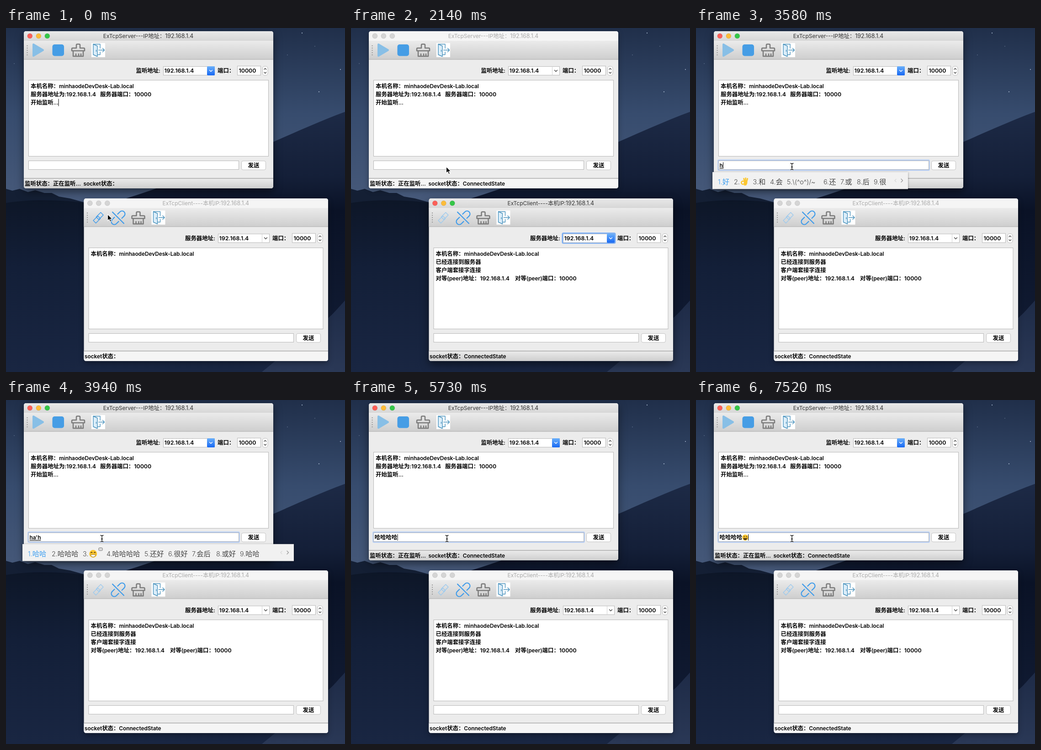
An HTML page that plays this animation: 742x755 px, repeating every 8 s.

```html
<!DOCTYPE html>
<html lang="zh-CN">
<head>
<meta charset="utf-8">
<title>TCP server and client</title>
<style>
html, body { margin: 0; width: 100%; height: 100%; overflow: hidden; background: #101b31; }
svg { display: block; width: 100vw; height: 100vh; }
text { font: 600 11.8px Inter, "Noto Sans CJK SC", "Noto Sans CJK", sans-serif; white-space: pre; }
.c { font-size: 12.4px; font-weight: 700; }
.n { font-size: 12.4px; }
.title { font-weight: 400; font-size: 12px; text-anchor: middle; }
.title .c { font-weight: 400; }
.mid { text-anchor: middle; }
.pre { text-decoration: underline; }
.cand { font-size: 14.3px; font-weight: 300; fill: #444; }
.cand .c { font-size: 15.27px; font-weight: 400; }
.first { fill: #3a9df0; }
.line { fill: none; stroke-linecap: round; stroke-linejoin: round; }
.active { filter: drop-shadow(0 7px 9px rgba(0,0,0,.5)); }
.idle { filter: drop-shadow(0 4px 6px rgba(0,0,0,.35)); }
.pop { filter: drop-shadow(0 1px 2px rgba(0,0,0,.4)); }
</style>
</head>
<body>
<svg viewBox="0 0 742 755" preserveAspectRatio="none">
  <defs>
    <linearGradient id="sky" x2="0" y2="1"><stop stop-color="#202f4a"/><stop offset=".45" stop-color="#374c6e"/><stop offset="1" stop-color="#4a5c7c"/></linearGradient>
    <linearGradient id="dune" x2="0" y2="1"><stop stop-color="#1d2a46"/><stop offset=".25" stop-color="#141f38"/><stop offset=".38" stop-color="#0a1226"/><stop offset="1" stop-color="#131e37"/></linearGradient>
    <linearGradient id="sand" x2="0" y2="1"><stop stop-color="#0d1627"/><stop offset=".4" stop-color="#131f38"/><stop offset="1" stop-color="#192642"/></linearGradient>
    <linearGradient id="near" x2="0" y2="1"><stop stop-color="#1e2b47"/><stop offset="1" stop-color="#2a3856"/></linearGradient>
    <linearGradient id="title" x2="0" y2="1"><stop stop-color="#e9e9e9"/><stop offset="1" stop-color="#d6d6d6"/></linearGradient>
    <linearGradient id="bar" x2="0" y2="1"><stop stop-color="#ebebeb"/><stop offset="1" stop-color="#cecece"/></linearGradient>
    <linearGradient id="blue" x2="0" y2="1"><stop stop-color="#6bb0fa"/><stop offset="1" stop-color="#1768f3"/></linearGradient>
    <g id="broom" class="line" stroke="#7c7c7c" stroke-width="2.5">
      <path d="M-4-5V-11.5q0-2 2-2H2q2 0 2 2V-5H12q2 0 2 2V1H-14V-3q0-2 2-2ZM-11 1V13H11V1M-5 13V8M1 13V8M6 13V8"/>
    </g>
    <g id="exit">
      <rect x="-15" y="-15.5" width="30" height="31" fill="#fff"/>
      <g class="line" stroke="#4b93bd" stroke-width="1.4">
        <path d="M-11-13H4V-4M4 4V10H-2"/><path d="M-11-13L-2-9V14L-11 10Z" fill="#dceefa"/><path d="M-4.5 0V3M1 0H13M9.5-4L13.5 0L9.5 4"/>
      </g>
    </g>
    <path id="grip" fill="#969696" d="M-1-10h2v2h-2zM-1-5h2v2h-2zM-1 0h2v2h-2zM-1 5h2v2h-2zM-1 10h2v2h-2z"/>
  </defs>
  <g id="wallpaper">
    <rect width="742" height="420" fill="url(#sky)"/>
    <g fill="#b9c8df"><circle cx="648" cy="11" r="1"/><circle cx="732" cy="91" r=".9"/><circle cx="685" cy="140" r="1"/><circle cx="616" cy="59" r=".6"/><circle cx="18" cy="78" r=".6"/><circle cx="676" cy="40" r=".6"/></g>
    <path d="M0 353L14 357L30 353L48 360L64 356L84 362L100 362L116 370L140 374L176 384V420H0Z" fill="#141f34"/>
    <path d="M742 184C690 203 640 226 585 250C450 305 360 345 250 378V755H742Z" fill="url(#dune)"/>
    <path d="M0 384C60 374 130 378 185 385L260 374C400 440 480 610 742 720V755H0Z" fill="url(#sand)"/>
    <path d="M742 598C725 616 714 632 690 648L560 755H742Z" fill="url(#near)"/>
  </g>
  <g id="scene"></g>
</svg>
<script>
const LOOP = 8000;
const HOST = '本机名称：minhaodeDevDesk-Lab.local';
const IP = '192.168.1.4';

const rect = (x, y, w, h, fill, more = '') =>
  `<rect x="${x}" y="${y}" width="${w}" height="${h}" fill="${fill}" ${more}/>`;
const path = (d, color, width, more = '') =>
  `<path class="line" d="${d}" stroke="${color}" stroke-width="${width}" ${more}/>`;
const at = (x, y, body) => `<g transform="translate(${x} ${y})">${body}</g>`;
const use = (id, x, y) => `<use href="#${id}" x="${x}" y="${y}"/>`;
// Chinese runs and long numbers are set slightly larger than Latin letters
const mix = s => s.replace(/([\u3000-\uffff]+)|[\d.]{4,}/g,
  (run, han) => `<tspan class="${han ? 'c' : 'n'}">${run}</tspan>`);
const text = (x, y, s, cls = '', fill = '') =>
  `<text x="${x}" y="${y}" class="${cls}" ${fill && `fill="${fill}"`}>${mix(s)}</text>`;

function frame(x, y, w, h, title, active) {
  const lights = active ? ['#fb5f58', '#fcbc3a', '#35c648'] : ['#d5d5d5', '#d5d5d5', '#d5d5d5'];
  const r = 5, top = `M0 22V${r}q0-${r} ${r}-${r}H${w - r}q${r} 0 ${r} ${r}V22Z`;
  const foot = `M0 ${h - 22}H${w}V${h - r}q0 ${r}-${r} ${r}H${r}q-${r} 0-${r}-${r}Z`;
  return at(x, y,
    rect(0, 0, w, h, '#ececec', `rx="${r}" class="${active ? 'active' : 'idle'}"`) +
    `<path d="${top}" fill="${active ? 'url(#title)' : '#f5f5f5'}"/>` +
    rect(0, 21, w, 41, 'url(#bar)') + rect(0, 61.5, w, 1, '#adadad') +
    `<path d="${foot}" fill="${active ? 'url(#bar)' : '#f5f5f5'}"/>` + rect(0, h - 22.5, w, 1, '#8a8a8a') +
    lights.map((c, i) => `<circle cx="${13.3 + 19 * i}" cy="10.5" r="5.5" fill="${c}" stroke="#000" stroke-opacity=".12" stroke-width=".8"/>`).join('') +
    text(w / 2 - .5, 14.8, title, 'title', active ? '#333' : '#aaa') + use('grip', 7.5, 41));
}

// Address box, port box and stepper, shared by both windows
function fields(dx, dy, active, ring) {
  const edge = 'stroke="#b9b9b9"';
  return at(dx, dy,
    (ring ? rect(343, 83, 115, 21.5, 'none', 'rx="2" stroke="#79aef7" stroke-width="3"') : '') +
    rect(344.5, 84.5, 112, 19, '#fff', edge) +
    (active ? rect(440, 84, 17, 20, 'url(#blue)', 'rx="2"') : path('M440.5 85V103', '#d0d0d0', 1)) +
    path('M445.5 92.5L448.5 95.5L451.5 92.5', active ? '#fff' : '#444', 1.4) +
    text(346.5, 98.2, IP) + text(463, 98.2, '端口：') +
    rect(506.5, 83.5, 51, 20, '#fff', edge) + text(509.5, 98.2, '10000') +
    rect(561.5, 84, 11.5, 20, '#fff', 'rx="4.5" stroke="#bbb"') +
    path('M565 91L567.3 88.5L569.6 91M565 97L567.3 99.5L569.6 97', '#444', 1.2));
}

const box = (x, y, w, h) => rect(x + .5, y + .5, w - 1, h - 1, '#fff', 'stroke="#b8b8b8"');
const button = (x, y) => rect(x, y, 53, 19.5, '#fff', 'rx="3.5" stroke="#c2c2c2"') +
  text(x + 26.5, y + 14, '发送', 'mid');
const lines = (x, y, list) => list.map((s, i) => text(x, y + 18.1 * i, s)).join('');

function server(s) {
  const on = s.active === 'server';
  return frame(39, 7, 546, 345, `ExTcpServer---IP地址：${IP}`, on) +
    path('M60 36L81 48.5L60 61Z', '#88bfe6', 4, 'style="fill:#88bfe6"') +
    rect(101.5, 36, 25.5, 25.5, '#469de5', 'rx="5"') +
    use('broom', 158, 49) + use('exit', 202, 48.5) +
    text(284.5, 98.2, '监听地址:') + fields(0, 0, on) +
    box(49, 114, 526, 168) +
    lines(54, 132.2, [HOST, `服务器地址为:${IP}   服务器端口：10000`, '开始监听...']) +
    (s.focus ? rect(48.5, 290, 462, 22, '#fff', 'rx="1.5" stroke="#b3cbf3" stroke-width="2.5"') : '') +
    box(49, 291, 461, 20) + button(515.5, 291.8) +
    text(41, 345.7, '监听状态：正在监听...  socket状态：' + (s.linked ? 'ConnectedState' : ''));
}

function client(s) {
  const on = s.active === 'client', log = [HOST];
  if (s.linked) log.push('已经连接到服务器', '客户端套接字连接',
    `对等(peer)地址：${IP}    对等(peer)端口：10000`);
  const turned = body => `<g transform="rotate(45)">${body}</g>`;
  const link = turned(path('M-4.5-12H3.5V2H-4.5ZM-3.5-2H4.5V12H-3.5Z', s.linked ? '#9fcbee' : '#409cea', 1.5));
  const unlink = turned(path('M-6.5-5V-12a6.5 6.5 0 0 1 13 0V-5M-6.5 5V12a6.5 6.5 0 0 0 13 0V5M-17.5 0H17.5', '#409cea', 2.2));
  return frame(170.5, 374, 534.5, 357, `ExTcpClient----本机IP:${IP}`, on) +
    at(202, 416.5, link) + at(245.5, 416.5, unlink) +
    use('broom', 289.5, 417) + use('exit', 333.5, 416) +
    text(392, 465.7, '服务器地址:') + fields(120, 367.5, on, on) +
    box(180.5, 482, 514, 179) + lines(185.5, 499.7, log) +
    box(180.5, 670, 449.5, 20) + button(635.5, 670.5) +
    text(172, 724.7, 'socket状态：' + (s.linked ? 'ConnectedState' : ''));
}

function emoji(kind, x, y, k = 1) {
  const skin = '#fbc62f', dark = '#4d3515';
  const disc = `<circle r="8.5" fill="${skin}"/>`;
  const eyes = path('M-5-2q1.5-3 3 0M2-2q1.5-3 3 0', dark, 1.3);
  const dots = path('M-3-3.5V-1.5M3-3.5V-1.5', dark, 2);
  const mouth = fill => `<path d="M-5.5 2H5.5Q4 7 0 7Q-4 7-5.5 2Z" fill="${fill}" stroke="${dark}" stroke-width=".6"/>`;
  const art = {
    hand: path('M1 0L-1-7M3 0L3-8M5 1L7-7', skin, 2.8) +
      `<circle cx="-3" cy="2" r="3.5" fill="none" stroke="${skin}" stroke-width="2.5"/>` +
      `<path d="M0 0L6-1Q8 3 4 8H-1L0 4Z" fill="${skin}"/>`,
    grin: disc + eyes + mouth('#fff'),
    smile: disc + dots + mouth(dark),
    cat: `<path d="M-8 1L-8-10L-2-5H2L8-10L8 1Z" fill="${skin}"/><ellipse cy="1.5" rx="9.5" ry="7.5" fill="${skin}"/>` + dots + mouth('#fff')
  };
  return `<g transform="translate(${x} ${y}) scale(${k})">${art[kind]}</g>`;
}

const badge = (x, y) => at(x, y, rect(-4, -3, 8, 6, 'none', 'rx="1.5" stroke="#666"') +
  path('M-1.8 0h.1M0 0h.1M1.8 0h.1', '#666', 1));

// Candidate list: each item is "x text" or "x :emoji"
function popup({ x, y, right, items }) {
  const base = y + 26.8;
  let out = rect(x, y, right - x, 37.3, '#f1f1f1', 'class="pop"');
  items.forEach((item, i) => {
    const [pos, word] = item.split(' '), ix = x + +pos, pic = word[0] === ':' && word.slice(1);
    out += text(ix, base, `${i + 1}.${pic ? '' : word}`, i ? 'cand' : 'cand first');
    if (pic) out += emoji(pic, ix + 22.7, base - 5.5);
    if (pic && pic !== 'hand') out += badge(ix + 39, base - 15.5);
  });
  const ay = y + 18.5;
  return out + path(`M${right - 26} ${ay - 3}l-3 3l3 3`, '#d8d8d8', 1.3) +
    path(`M${right - 15} ${ay - 3.5}l3.5 3.5l-3.5 3.5`, '#999', 1.3);
}

const hItems = ['12 好', '47 :hand', '88.5 和', '126 会', '163 \\(^o^)/~', '243 还', '280 或', '316 后', '353 很'];
const low = { x: 36, y: 316.2 }, shifted = { x: 86, y: 319 };
const pops = {
  h: { ...low, right: 464, items: hItems },
  hah: { ...low, right: 630, items: ['12 哈哈', '64 哈哈哈', '132 :grin', '184 哈哈哈哈', '267 还好', '319 很好', '371 会后', '424 或好', '476 哈哈'] },
  long: { ...low, right: 751, items: ['12 哈哈哈哈', '92.5 哈哈哈哈哈', '190.5 哈哈哈哈哈哈哈', '318.5 哈哈哈或', '401.5 哈哈哈', '469.5 :grin', '522 哈哈', '573.5 :cat', '626 蛤蛤'] },
  h2: { ...shifted, right: 514, items: hItems },
  haha: { ...shifted, right: 651.5, items: ['12 哈哈', '62 :cat', '114 好啊好啊', '196.5 ^_^', '242.5 O(∩_∩)O哈哈~', '365 蛤蛤', '417.5 哈', '454 蛤', '491 铪'] },
  hahah: { ...shifted, right: 681, items: ['12 哈哈哈', '79.5 :smile', '131.5 哈哈哈哈', '214.5 哈哈', '266.8 哈哈好', '334 好哈', '386.5 蛤蛤', '439 哈哈', '491 哈哈哈'] }
};

// Each step changes only what it names
const steps = [
  [0, { active: 'server', linked: false, focus: false, done: '', typed: '', pop: '', beam: false, smile: false, mouse: [222, 409], caret: [114.5, 155.5, 16] }],
  [360, { mouse: [202.5, 415], caret: 0 }],
  [720, { active: 'client', linked: true, caret: [533.5, 454, 13.5] }],
  [1080, { caret: 0 }],
  [1430, { mouse: [196, 382.5] }],
  [1790, { mouse: [201, 307], caret: [533.5, 454, 13.5] }],
  [2140, { mouse: [208, 304.5], caret: 0 }],
  [2500, { active: 'server', focus: true, beam: true, mouse: [210, 304], caret: [51.5, 294.5, 14] }],
  [2860, { caret: 0 }],
  [3580, { typed: 'h', pop: 'h', caret: [59, 294.5, 14] }],
  [3940, { typed: "ha'h", pop: 'hah', caret: 0 }],
  [4300, { typed: "ha'ha'ha'h", pop: 'long' }],
  [4660, { caret: [110.5, 294.5, 14] }],
  [5010, { caret: 0 }],
  [5730, { done: '哈哈哈哈', typed: '', pop: '', caret: [101.5, 294.5, 14] }],
  [6090, { typed: 'h', pop: 'h2', caret: 0 }],
  [6440, { typed: "ha'ha", pop: 'haha' }],
  [6800, { typed: "ha'ha'h", pop: 'hahah', caret: [143.5, 294.5, 14] }],
  [7160, { caret: 0 }],
  [7520, { typed: '', pop: '', smile: true, caret: [114, 294.5, 14] }]
];

function pointer(s) {
  const beam = 'M-3-7Q0-7 0-5Q0-7 3-7M0-5V5M-3 7Q0 7 0 5Q0 7 3 7M-1.5 1H1.5';
  return at(...s.mouse, s.beam
    ? path(beam, '#fff', 2.6) + path(beam, '#111', 1.3)
    : '<path d="M.5 0V14L3.8 11L6 16.3L8.5 15.2L6.3 10.2H10.6Z" fill="#000" stroke="#fff" stroke-width="1.1"/>');
}

function draw(s) {
  const input = `<text x="51.5" y="306.3">${mix(s.done)}<tspan class="pre">${s.typed}</tspan></text>`;
  const [cx, cy, ch] = s.caret || [];
  return server(s) + client(s) + input +
    (s.smile ? emoji('smile', 107.8, 301.8, .78) : '') +
    (s.pop ? popup(pops[s.pop]) : '') +
    (s.caret ? rect(cx, cy, 1, ch, '#000') : '') + pointer(s);
}

const scene = document.getElementById('scene'), start = performance.now();
let shown = -1;
function tick(now) {
  const t = Math.max(0, now - start) % LOOP;
  const past = steps.filter(([time]) => time <= t);
  if (past.length !== shown) {
    shown = past.length;
    scene.innerHTML = draw(Object.assign({}, ...past.map(([, change]) => change)));
  }
  requestAnimationFrame(tick);
}
tick(start);
</script>
</body>
</html>
```
